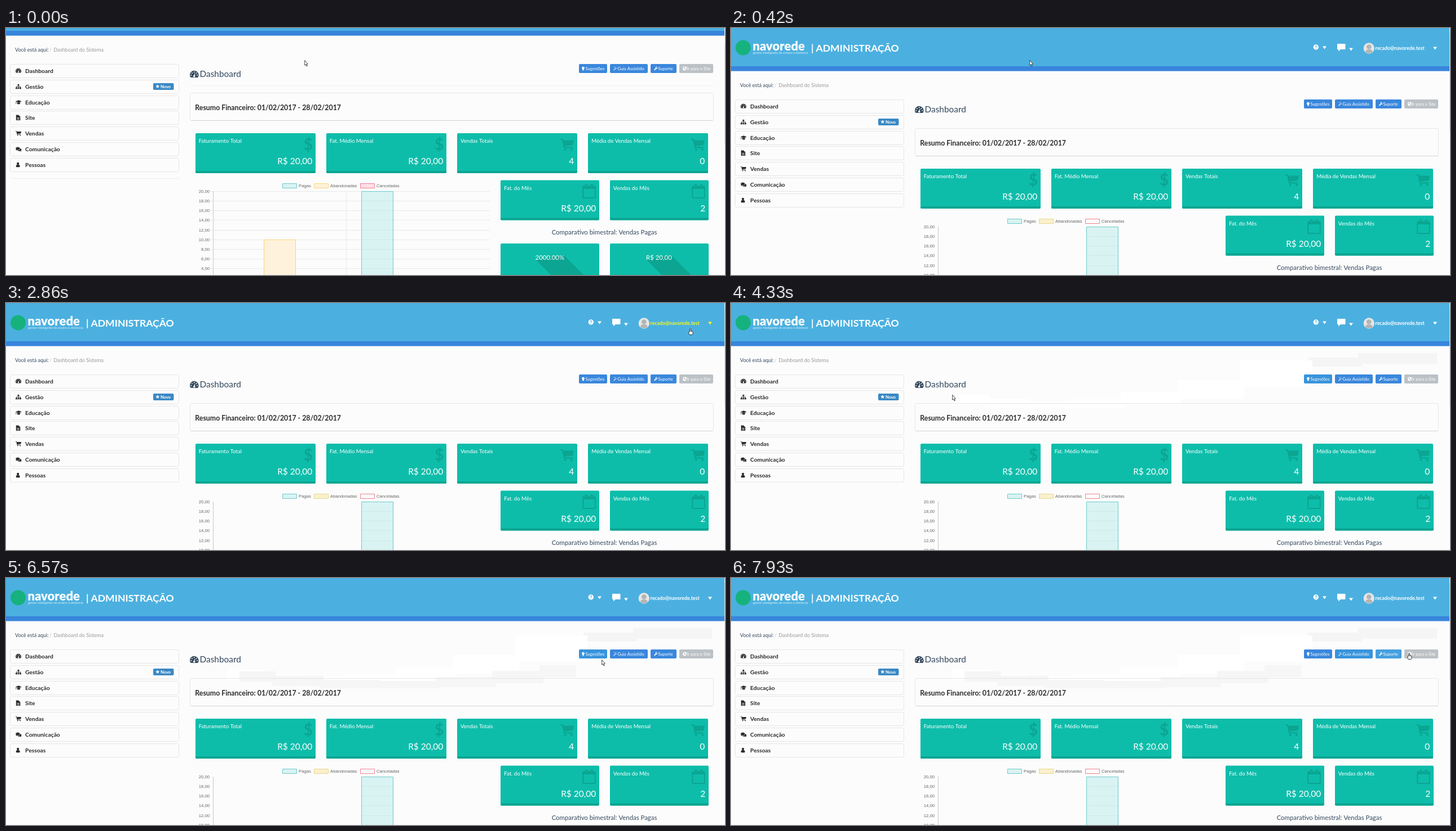
Animation, 1275 px wide and 439 px high, one loop 8000 ms. Source, as an HTML page with a canvas:

```html
<!DOCTYPE html>
<html lang="pt-BR">
<head>
<meta charset="utf-8">
<title>Dashboard</title>
<style>
html, body { margin: 0; width: 100%; height: 100%; overflow: hidden; background: #fcfcfc; }
canvas { display: block; width: 1275px; height: 439px; }
</style>
</head>
<body>
<canvas id="stage" width="1275" height="439"></canvas>
<script>
const ctx = document.getElementById('stage').getContext('2d');
const LOOP = 8000;
const TEAL = '#0dbdaa', TEAL_DARK = '#0ba592', INK = '#34495e', TEXT = '#2b2b2b', PAGE = '#fcfcfc';

const linear = p => p;
const easeOut = p => p * (1.4 - 0.4 * p);
const smooth = p => p * p * (3 - 2 * p);

// Each move runs in equal steps along an arc; `via` is the height of its control point.
const MOVES = [
  { start: 1450, end: 2330, steps: 7, to: [1208, 44], ease: smooth },
  { start: 2610, end: 3010, steps: 4, to: [1211, 45], ease: linear },
  { start: 3140, end: 3140, steps: 1, to: [1245, 89], ease: linear },
  { start: 3270, end: 3410, steps: 2, to: [1024, 102], ease: easeOut, smear: '#f5f5f5' },
  { start: 3540, end: 4330, steps: 7, to: [392, 163], via: 207, ease: easeOut, smear: '#fff' },
  { start: 4860, end: 5880, steps: 9, to: [1026, 151], via: 213, ease: smooth, smear: '#f6f6f6' },
  { start: 6030, end: 6300, steps: 3, to: [1041, 146], ease: linear },
  { start: 6570, end: 7560, steps: 8, to: [1164, 134], ease: linear },
  { start: 7680, end: 7930, steps: 3, to: [1199, 133], ease: linear }
];

// Unroll the moves into timed positions.
const path = [{ t: 0, x: 529, y: 57 }];
for (const { start, end, steps, to, via, ease, smear } of MOVES) {
  const from = path[path.length - 1];
  const mid = via || (from.y + to[1]) / 2;
  for (let i = 1; i <= steps; i++) {
    const p = ease(i / steps), q = 1 - p;
    path.push({
      t: start + (end - start) * (i - 1) / Math.max(1, steps - 1) - 5,
      x: Math.round(from.x * q + to[0] * p),
      y: Math.round(from.y * q * q + mid * 2 * p * q + to[1] * p * p),
      smear
    });
  }
}

// Fast steps leave a pale block that spans both pointer positions.
function trail(t) {
  path.forEach((b, i) => {
    if (!b.smear || t < b.t) return;
    const a = path[i - 1], dx = Math.abs(a.x - b.x);
    if (dx > 55) rect(Math.min(a.x, b.x), Math.min(a.y, b.y), dx + 7, Math.abs(a.y - b.y) + 11, b.smear);
  });
}

const scrollAt = t => t < 125 ? 63 : t < 275 ? 60 : t < 415 ? 52 : 0;

function text(str, x, y, size, color = '#fff', weight = 400, align = 'left', family = 'Lato') {
  ctx.font = `${weight} ${size}px "${family}", sans-serif`;
  ctx.fillStyle = color;
  ctx.textAlign = align;
  ctx.fillText(str, x, y);
}

function paint(fill, stroke, width = 1) {
  if (fill) { ctx.fillStyle = fill; ctx.fill(); }
  if (stroke) { ctx.strokeStyle = stroke; ctx.lineWidth = width; ctx.stroke(); }
}

function rect(x, y, w, h, color) {
  ctx.fillStyle = color;
  ctx.fillRect(x, y, w, h);
}

function round(x, y, w, h, r, fill, stroke) {
  ctx.beginPath();
  ctx.roundRect(x, y, w, h, r);
  paint(fill, stroke);
}

function oval(x, y, rx, ry, fill, stroke, width) {
  ctx.beginPath();
  ctx.ellipse(x, y, rx, ry, 0, 0, 7);
  paint(fill, stroke, width);
}

const disc = (x, y, r, color) => oval(x, y, r, r, color);

function poly(color, ...pts) {
  ctx.beginPath();
  pts.forEach(p => ctx.lineTo(...p));
  ctx.closePath();
  paint(color);
}

function line(color, width, ...pts) {
  ctx.beginPath();
  pts.forEach(p => ctx.lineTo(...p));
  paint(null, color, width);
}

// Icons live in a box about 12 units wide.
const icons = {
  gauge(c) {
    ctx.beginPath();
    ctx.arc(6, 6.2, 6, 2.55, 0.6);
    ctx.closePath();
    paint(c);
    for (let i = 0; i < 5; i++) {
      const a = Math.PI * (1 + i / 4);
      disc(6 + 4.2 * Math.cos(a), 6.4 + 4.2 * Math.sin(a), 0.75, PAGE);
    }
    line(PAGE, 0.9, [6, 7.8], [7.1, 4]);
    disc(6, 7.8, 1.4, PAGE);
  },
  sitemap(c) {
    rect(4.3, 0.5, 3.4, 3.2, c);
    for (const x of [0, 4.3, 8.6]) rect(x, 7.3, 3.4, 3.2, c);
    rect(1.3, 5.1, 9.4, 0.9, c);
    for (const x of [1.3, 5.6, 9.8]) rect(x, 5.1, 0.9, 3, c);
    rect(5.6, 3, 0.9, 3, c);
  },
  cap(c) {
    poly(c, [6.5, 1], [13, 3.7], [6.5, 6.4], [0, 3.7]);
    round(3, 6, 7, 3.5, [0, 0, 3, 3], c);
    rect(0.6, 4, 0.8, 5, c);
  },
  file(c) {
    poly(c, [1, 0], [6, 0], [10, 3.6], [10, 11.5], [1, 11.5]);
    for (const y of [5.5, 7.3, 9.1]) rect(3, y, 5, 0.8, PAGE);
  },
  cart(c) {
    line(c, 1.1, [0, 1], [2, 1], [3.6, 8.2], [10.8, 8.2]);
    poly(c, [2.4, 1.8], [12, 1.8], [11.2, 6], [3.2, 7]);
    for (const x of [4.3, 10]) disc(x, 10, 1, c);
  },
  chats(c) {
    oval(8, 7, 4.4, 3, c);
    poly(c, [9, 9], [12, 11], [11.3, 7.5]);
    oval(4.7, 4.4, 4.7, 3.4, c, PAGE, 0.7);
    poly(c, [1.3, 6], [0.8, 8.8], [4.2, 7.3]);
  },
  user(c) {
    disc(5, 3, 2.6, c);
    round(0.8, 5.4, 8.4, 5.2, [3, 3, 1.5, 1.5], c);
  },
  star(c) {
    poly(c, ...Array.from({ length: 10 }, (_, i) => {
      const a = i * Math.PI / 5 - Math.PI / 2, r = i % 2 ? 2.6 : 6;
      return [6 + r * Math.cos(a), 6 + r * Math.sin(a)];
    }));
  },
  bulb(c) {
    disc(6, 4.5, 4, c);
    rect(4, 7, 4, 4.8, c);
  },
  wand(c) {
    line(c, 2, [1, 11.5], [8, 4.5]);
    for (let i = 0; i < 3; i++) rect(2 + 4 * i, 1 + 2 * i * (i - 1), 1.8, 1.8, c);
  },
  wrench(c) {
    line(c, 2.8, [1, 11], [7, 5]);
    ctx.beginPath();
    ctx.arc(8.3, 3.7, 2.6, 0, 5);
    paint(null, c, 2);
  },
  globe(c) {
    disc(6, 6, 5.8, c);
    oval(5, 4.5, 2, 2.4, '#bbc1c5');
    oval(8.3, 8, 1.5, 1.8, '#bbc1c5');
  },
  calendar(c) {
    round(0.6, 2, 10.8, 10.2, 0.6, null, c);
    rect(0.6, 2, 10.8, 2.2, c);
    for (const x of [2.8, 7.7]) round(x, 0.4, 1.4, 2.8, 0.6, TEAL, c);
  }
};

function icon(name, x, y, width, color) {
  ctx.save();
  ctx.translate(x, y);
  ctx.scale(width / 12, width / 12);
  icons[name](color);
  ctx.restore();
}

const caret = (x, y, color = '#fff') => poly(color, [x, y], [x + 7, y], [x + 3.5, y + 5]);

function header(hot) {
  rect(0, 0, 1274, 68, '#4bb0e0');
  rect(0, 68, 1274, 8.6, '#3885dc');
  disc(21.5, 35, 13.5, '#16b27d');
  text('navorede', 38.5, 40, 22, '#fff', 900);
  text('gestor inteligente de ensino à distância', 39, 46, 5.75, 'rgba(255,255,255,.8)');
  text('|', 142, 42, 17.6, '#fff', 700);
  text('ADMINISTRAÇÃO', 150.5, 42, 17.6, '#fff', 700);

  disc(1037.3, 34, 4.7, '#fff');
  text('?', 1037.3, 37, 8, '#4bb0e0', 900, 'center');
  caret(1049, 32.5);
  round(1075, 28, 14.5, 10, 1, '#fff');
  poly('#fff', [1077, 37], [1077, 41.5], [1082, 37]);
  caret(1096, 35.5);

  disc(1131.3, 36, 9.7, '#e6e6e6');
  disc(1131.3, 33.5, 4.3, '#b4b4b4');
  oval(1131.3, 41.5, 6.2, 3.6, '#b4b4b4');
  const color = hot ? '#f6f81c' : '#fff';
  text('recado@navorede.test', 1142.5, 38.7, 8.75, color, 700);
  caret(1245, 33.5, color);
}

const MENU = {
  Dashboard: 'gauge', Gestão: 'sitemap', Educação: 'cap', Site: 'file',
  Vendas: 'cart', Comunicação: 'chats', Pessoas: 'user'
};

function sidebar() {
  text('Você está aqui:', 16, 105, 9, INK);
  text('/', 77, 105, 9, '#c4c4c4');
  text('Dashboard do Sistema', 84.5, 105, 9, '#999');
  Object.entries(MENU).forEach(([label, name], i) => {
    const y = 127.5 + Math.round(i * 27.75);
    round(7.5, y, 299, 24, 3, null, '#e6e6e6');
    icon(name, 17, y + 7, 10, TEXT);
    text(label, 34, y + 15.2, 10.3, TEXT, 700);
  });
  round(261, 161, 36.5, 12, 2, '#3a88c4');
  icon('star', 265, 163, 7.6, '#fff');
  text('Novo', 274, 169.8, 7.6, '#fff', 700);
}

function button(x, w, label, name, color) {
  const pad = name === 'bulb' ? 4 : 6;
  round(x, 127, w, 16, 2, color);
  icon(name, x + pad, 131.5, 7, '#fff');
  text(label, x + pad + 7.5, 138.3, 7.6);
}

function buttons(t) {
  const blue = lit => lit ? '#3894dc' : '#3a87dc';
  button(1016, 50, 'Sugestões', 'bulb', blue(t > 3400 && t < 7130));
  button(1071, 67, 'Guia Assistido', 'wand', blue(t > 7000));
  button(1143, 46, 'Suporte', 'wrench', t > 7400 ? '#459fdf' : blue(false));
  button(1194, 60, 'Ir para o Site', 'globe', '#bbc1c5');
}

function card(x, y, w, label, value, name) {
  const left = Math.round(x), right = left + w - 6;
  round(left, y, w, 71, 2, TEAL);
  round(left, y + 67, w, 4, [0, 0, 2, 2], TEAL_DARK);
  if (name === 'dollar') text('$', right - 7, y + 30, 28, TEAL_DARK, 700, 'center');
  else icon(name, right - 24, y + (name === 'cart' ? 9 : 7), 24, TEAL_DARK);
  text(label, x + 6.2, y + 17.3, 9.6);
  text(value, right + 0.3, y + 55, 15.5, '#fff', 400, 'right');
}

function ratioCard(x, label, half) {
  const mid = x + 87.3;
  round(Math.round(x), 446, 175, 90, 2, TEAL);
  poly(TEAL_DARK, [mid - half, 475], [mid + half, 467], [mid + half + 69, 536], [mid - half + 61, 536]);
  text(label, mid, 474.5, 11.4, '#fff', 400, 'center');
}

function chart(faded) {
  const label = (str, x, y, align) => text(str, x, y, 7.7, '#666', 400, align, 'Liberation Sans');
  const legend = (x, name, fill, stroke) => {
    round(x + 0.5, 339.5, 25, 8, 0, fill, stroke);
    label(name, x + 29, 346.3);
  };
  legend(490, 'Pagas', '#d9f3f2', '#6fcaca');
  legend(546, 'Abandonadas', faded ? '#faf0cd' : '#fff2da', faded ? '#e6d88c' : '#fbd67c');
  legend(628, 'Canceladas', faded ? PAGE : '#ffe0e6', '#f0808f');

  const rowY = i => Math.round(353 + 17.14 * i) + 0.5;
  for (let i = 0; i < 10; i++) {
    label(`${20 - 2 * i},00`, 361, rowY(i) + 2.7, 'right');
    if (!faded) line('#e9e9e9', 1, [362, rowY(i)], [858, rowY(i)]);
  }
  if (!faded) line('#ececec', 1, [603.5, 353], [603.5, 520]);
  line('#c8c8c8', 1, [367.5, 353], [367.5, 520]);
  round(457.5, 439.5, 56, 100, 0, '#fff2dc', '#f8d478');
  round(630.5, 353.5, 56, 200, 0, '#d9f3f3', '#6fcaca');
  for (let i = 1; i < 10; i++) line('#cfe9e9', 1, [631, rowY(i)], [686, rowY(i)]);
}

function content(t, faded) {
  icon('gauge', 326, 138.5, 15.5, INK);
  text('Dashboard', 343.5, 150, 15.4, INK);
  if (!faded) {
    line('#eee', 1, [326, 165.5], [1255, 165.5]);
    line('#eee', 1, [8, 330.5], [307, 330.5]);
  }
  buttons(t);
  round(326.5, 178.5, 928, 49, 3, null, '#e6e6e6');
  line('#d2d2d2', 1, [328, 227.5], [1253, 227.5]);
  text('Resumo Financeiro: 01/02/2017 - 28/02/2017', 335.3, 208.7, 12.35, TEXT, 700);

  const wide = i => 335.5 + 232.15 * i, narrow = i => 877 + 193.6 * i;
  card(wide(0), 250, 213, 'Faturamento Total', 'R$ 20,00', 'dollar');
  card(wide(1), 250, 213, 'Fat. Médio Mensal', 'R$ 20,00', 'dollar');
  card(wide(2), 250, 213, 'Vendas Totais', '4', 'cart');
  card(wide(3), 250, 213, 'Média de Vendas Mensal', '0', 'cart');
  card(narrow(0), 333.5, 175, 'Fat. do Mês', 'R$ 20,00', 'calendar');
  card(narrow(1), 333.5, 175, 'Vendas do Mês', '2', 'calendar');
  text('Comparativo bimestral: Vendas Pagas', 1061, 430.3, 11.4, INK, 400, 'center');
  ratioCard(narrow(0), '2000.00%', 25);
  ratioCard(narrow(1), 'R$ 20,00', 22);
  chart(faded);
}

function pointer(x, y, hand) {
  ctx.save();
  ctx.translate(x, y);
  ctx.lineJoin = 'round';
  if (hand) {
    round(1, 5, 7, 6.5, 2, '#fff', '#333');
    round(2.5, 0.8, 2, 7, 1, '#fff', '#333');
    rect(2, 6, 5, 3, '#fff');
  } else {
    ctx.beginPath();
    [[0.7, 0.5], [0.7, 9.2], [2.6, 7.6], [4, 11], [5.4, 10.4], [4, 7.1], [6.4, 7]]
      .forEach(p => ctx.lineTo(...p));
    ctx.closePath();
    paint('#fff', '#333', 0.9);
  }
  ctx.restore();
}

function draw() {
  const t = performance.now() % LOOP;
  const scroll = scrollAt(t);
  const { x, y } = path.filter(p => p.t <= t).pop();
  const onAccount = x > 1118 && y < 55;
  const onButton = x > 1013 && x < 1252 && y > 125 && y < 143;

  rect(0, 0, 1275, 439, PAGE);
  trail(t);
  ctx.save();
  ctx.translate(0, -scroll);
  header(onAccount);
  sidebar();
  content(t, scroll === 0);
  ctx.restore();
  rect(1274, 0, 1, 439, PAGE);
  rect(1274, 9 + scroll * 0.36, 1, 174, '#e4e4e4');
  pointer(x, y, onAccount || onButton);
  requestAnimationFrame(draw);
}
draw();
</script>
</body>
</html>
```
